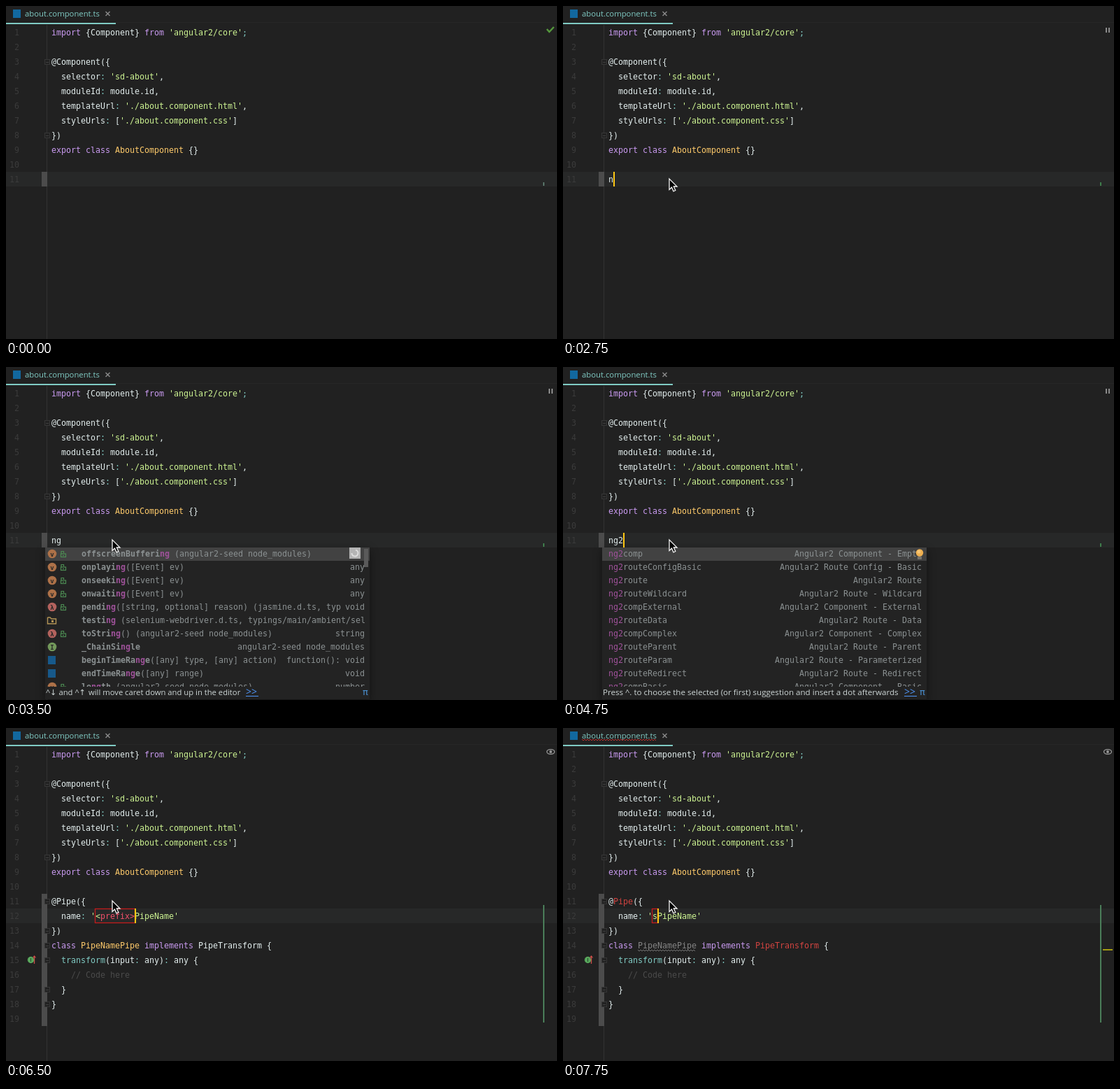
An HTML page with a canvas for the animation above (8000 ms loop, 788 by 476 pixels).

```html
<!DOCTYPE html>
<html lang="en">
<head>
<meta charset="utf-8">
<title>Editor live templates</title>
<style>
html, body { margin: 0; width: 100%; height: 100%; overflow: hidden; background: #212121; }
canvas { display: block; }
</style>
</head>
<body>
<canvas id="stage" width="788" height="476"></canvas>
<script>
const ctx = document.getElementById('stage').getContext('2d');
const LOOP = 8000, TICK = 250;
const CHAR = 7, LINE = 21, LEFT = 65, ROW = 19, POP_TOP = 258;
const MONO = '11.63px "DejaVu Sans Mono", monospace';
const UI = '"Open Sans", "DejaVu Sans", sans-serif';
const BG = '#212121';

// "~x" inside a text switches to colour x
const COLORS = {
  w: '#e3eeee', p: '#c99af0', s: '#cdf492', t: '#80cbc4', y: '#ffcb6b', r: '#d24440',
  g: '#858585', c: '#4b4b4b', m: '#a0529b', d: '#8b9192', k: '#f0506a'
};

const HEAD = [
  "~pimport ~w{Component} ~pfrom ~s'angular2/core'~t;",
  '',
  '~w@Component({',
  "~w  selector~t: ~s'sd-about'~w,",
  '~w  moduleId~t: ~wmodule.id,',
  "~w  templateUrl~t: ~s'./about.component.html'~w,",
  "~w  styleUrls~t: ~w[~s'./about.component.css'~w]",
  '~w})',
  '~pexport class ~yAboutComponent ~w{}',
  ''
];

const pipeCode = (prefix, checked) => [
  `~w@${checked ? '~r' : '~w'}Pipe~w({`,
  `~w  name~t: ~s'${prefix}~sPipeName'`,
  '~w})',
  `~pclass ${checked ? '~g' : '~y'}PipeNamePipe ~pimplements ${checked ? '~r' : '~w'}PipeTransform ~w{`,
  '~t  transform~w(input~t: ~wany)~t: ~wany {',
  '~c    // Code here',
  '~w  }',
  '~w}',
  ''
];

// icon | name | details | type
const SYMBOLS = [
  'v|offscreenBufferi~mng| (angular2-seed node_modules)|',
  'v|onplayi~mng|([Event] ev)|any',
  'v|onseeki~mng|([Event] ev)|any',
  'v|onwaiti~mng|([Event] ev)|any',
  'λ|pendi~mng|([string, optional] reason) (jasmine.d.ts, typ|void',
  'f|testi~mng| (selenium-webdriver.d.ts, typings/main/ambient/sel|',
  'λ|toStri~mng|() (angular2-seed node_modules)|string',
  'I|_ChainSi~mng~dle||angular2-seed node_modules',
  'q|beginTimeRa~mng~de|([any] type, [any] action)|function(): void',
  'q|endTimeRa~mng~de|([any] range)|void',
  'v|le~mng~dth| (angular2-seed node_modules)|number'
];

const template = (name, kind) => `|~mng2~d${name}||Angular2 ${kind}`;
const TEMPLATES = [
  template('comp', 'Component - Empty'),
  template('routeConfigBasic', 'Route Config - Basic'),
  template('route', 'Route'),
  template('routeWildcard', 'Route - Wildcard'),
  template('compExternal', 'Component - External'),
  template('routeData', 'Route - Data'),
  template('compComplex', 'Component - Complex'),
  template('routeParent', 'Route - Parent'),
  template('routeParam', 'Route - Parameterized'),
  template('routeRedirect', 'Route - Redirect'),
  template('compBasic', 'Component - Basic')
];
const PIPES = [
  template('~mp~dipeBasic', 'Pipe - Basic'),
  template('route~mP~daram', 'Route - Parameterized'),
  template('route~mP~darent', 'Route - Parent')
];

const lineTop = n => 27 + (n - 1) * LINE;

function rect(x, y, w, h, color) {
  ctx.fillStyle = color;
  ctx.fillRect(x, y, w, h);
}

function disc(x, y, r, color) {
  ctx.fillStyle = color;
  ctx.beginPath();
  ctx.arc(x, y, r, 0, Math.PI * 2);
  ctx.fill();
}

function path(points, stroke, width = 1, fill) {
  ctx.beginPath();
  points.forEach(([x, y], i) => i ? ctx.lineTo(x, y) : ctx.moveTo(x, y));
  if (fill) {
    ctx.closePath();
    ctx.fillStyle = fill;
    ctx.fill();
  }
  if (stroke) {
    ctx.strokeStyle = stroke;
    ctx.lineWidth = width;
    ctx.stroke();
  }
}

function frame(x, y, w, h, color, width = 1) {
  ctx.strokeStyle = color;
  ctx.lineWidth = width;
  ctx.strokeRect(x, y, w, h);
}

function label(text, x, y, color, font = MONO, align = 'left') {
  ctx.font = font;
  ctx.textAlign = align;
  ctx.fillStyle = color;
  ctx.fillText(text, x, y);
}

function rich(text, x, y, color = COLORS.d, font = MONO) {
  text.split('~').forEach((part, i) => {
    if (i) {
      color = COLORS[part[0]];
      part = part.slice(1);
    }
    label(part, x, y, color, font);
    x += part.length * CHAR;
  });
  return x;
}

function squiggle(x1, x2, y, color) {
  const points = [];
  for (let x = x1, i = 0; x <= x2; x += 2, i++) points.push([x, y + (i % 2) * 2]);
  path(points, color);
}

function drawTab(error) {
  rect(157, 23, 631, 1, '#272727');
  rect(0, 24, 157, 2, '#80cbc4');
  rect(10, 5, 11, 12, '#12689f');
  label('about.component.ts', 27, 15, '#80cbc4', '11.3px ' + UI);
  path([[142.5, 8], [148.5, 14]], '#8a8a8a', 1.4);
  path([[148.5, 8], [142.5, 14]], '#8a8a8a', 1.4);
  if (error) squiggle(27, 134, 16, '#b8322e');
}

function drawStatus(kind) {
  if (kind === 'ok') path([[773.5, 33], [777, 37], [783.5, 30]], '#55983d', 2.5);
  if (kind === 'busy') {
    rect(776, 31, 2, 7, '#8a8a8a');
    rect(780, 31, 2, 7, '#8a8a8a');
  }
  if (kind === 'error') {
    disc(779, 34, 5, '#8e303b');
    rect(778, 31, 2, 4, BG);
    rect(778, 36, 2, 1, BG);
  }
  if (kind === 'eye') {
    ctx.beginPath();
    ctx.ellipse(779, 34, 5.5, 3.4, 0, 0, Math.PI * 2);
    ctx.strokeStyle = '#9a9a9a';
    ctx.lineWidth = 1.3;
    ctx.stroke();
    disc(779, 34, 1.9, '#9a9a9a');
  }
}

function drawFold(line) {
  const y = lineTop(line) + 7;
  rect(55, y, 8, 8, BG);
  frame(55.5, y + .5, 7, 7, '#363636');
  rect(57, y + 4, 4, 1, '#404040');
}

function drawEditor(code, current, lastChanged, folds) {
  rect(0, lineTop(current), 788, LINE, '#272828');
  rect(58, 27, 1, 449, '#323232');
  rect(51, 237, 8, lastChanged * LINE - 210 , '#4c4c4c');
  folds.forEach(drawFold);
  code.forEach((text, i) => {
    const y = lineTop(i + 1) + 15;
    label(i + 1, 19, y, '#3b3b3b', MONO, 'right');
    rich(text, LEFT, y);
  });
}

function drawCaret(column, line) {
  rect(LEFT + column * CHAR, lineTop(line), 2, LINE, '#ffc814');
}

function drawMouse(x, y) {
  const shape = [[0, 0], [0, 15.5], [3.5, 12.2], [6, 17.8], [8.8, 16.5], [6.3, 11], [11, 11]];
  path([...shape, shape[0]].map(([dx, dy]) => [x + dx, y + dy]), '#f4f4f4', 1.3, '#000');
}

function drawIcon(kind, y) {
  if (kind === 'q') return rect(60, y - 6, 11, 12, '#17598a');
  if (kind === 'f') {
    path([[59.5, y - 4], [63, y - 4], [65, y - 2], [71.5, y - 2], [71.5, y + 5], [59.5, y + 5], [59.5, y - 4]], '#b39455', 1.4);
    return rect(65, y, 3, 3, '#b39455');
  }
  disc(66, y, 6.3, { v: '#ad7148', 'λ': '#b3625d', I: '#72985a' }[kind]);
  label(kind, 66, y + 3.5, '#272727', 'bold 9px "DejaVu Sans Mono", monospace', 'center');
  if (kind === 'I') return;
  frame(78.5, y, 7, 4.5, '#4c8b52', 1.2);
  path([[79, y], [79, y - 3.5], [82.5, y - 3.5], [82.5, y - 1]], '#4c8b52', 1.2);
  rect(81, y + 2, 2, 1, '#4c8b52');
}

function drawBulb() {
  disc(510, 265.5, 5.2, '#efb050');
  disc(509, 264, 2.5, '#f8c676');
  rect(507, 271, 6, 4, '#77736c');
}

function drawSpinner(turn) {
  rect(491, 258, 16, 16, '#b4b4b4');
  ctx.beginPath();
  ctx.arc(499, 266, 4.5, turn, turn + 4.5);
  ctx.strokeStyle = '#dedede';
  ctx.lineWidth = 2;
  ctx.stroke();
}

function drawHint(y, withArrows) {
  if (withArrows) {
    label('^↓ and ^↑', 57, y, '#cdd6d6', '11.25px ' + UI);
    label('will move caret down and up in the editor', 118, y, '#cdd6d6', '11.25px ' + UI);
  } else {
    label('Press ^. to choose the selected (or first) suggestion and insert a dot afterwards',
      57, y, '#cdd6d6', '11.6px ' + UI);
  }
  const x = withArrows ? 343 : 488;
  label('>>', x, y, '#4f94f5', '14px ' + UI);
  rect(x, y + 1, 18, 1, '#4f94f5');
  label('π', 510, y, '#4a90d0', '13px "DejaVu Sans", sans-serif');
}

function drawPopup(rows, withIcons) {
  const hintTop = rows.length > 5 ? 457 : POP_TOP + rows.length * ROW - 1;
  const height = hintTop + 18 - POP_TOP;
  ctx.save();
  ctx.shadowColor = 'rgba(0,0,0,.45)';
  ctx.shadowBlur = 12;
  ctx.shadowOffsetY = 4;
  rect(56, POP_TOP, 464, height, '#232323');
  ctx.restore();
  ctx.save();
  ctx.beginPath();
  ctx.rect(56, POP_TOP, 464, hintTop - POP_TOP);
  ctx.clip();
  rect(56, POP_TOP, 464, ROW, '#424242');
  rows.forEach((row, i) => {
    const [icon, name, details, type] = row.split('|');
    const y = POP_TOP + 13 + i * ROW;
    if (icon) drawIcon(icon, y - 4);
    const end = rich(name, withIcons ? 108 : LEFT, y, COLORS.d, (withIcons ? 'bold ' : '') + MONO);
    label(details, end, y, COLORS.d);
    label(type, 513, y, COLORS.d, MONO, 'right');
  });
  ctx.restore();
  if (withIcons) rect(512, 260, 6, 26, '#5a5a5a');
  drawHint(hintTop + 12, withIcons);
}

function drawTooltip() {
  path([[65, 226], [72.5, 235], [80, 226]], '#6797b2', 1, '#376c8b');
  ctx.beginPath();
  ctx.roundRect(-10, 203.5, 179.5, 23, 4);
  ctx.fillStyle = '#376c8b';
  ctx.fill();
  ctx.strokeStyle = '#6797b2';
  ctx.lineWidth = 1;
  ctx.stroke();
  rect(67, 225, 11, 3, '#376c8b');
  label('Pipe ( metadata.d.ts )?', -2, 220, '#b9ccd6', '13px ' + UI);
  label('⌥⏎', 139, 220, '#b9ccd6', '13px "DejaVu Sans", sans-serif');
}

function drawTyping(t) {
  const typed = t < 2750 ? '' : 'ng2p'.slice(0, t < 3000 ? 1 : t < 4250 ? 2 : t < 5000 ? 3 : 4);
  const caretOn = t >= 1750 && !(t >= 3500 && t < 4000) && !(t >= 5750 && t < 6250);
  drawEditor([...HEAD, '~w' + typed], 11, 11, [3, 8]);
  drawTab(false);
  drawStatus(typed ? 'busy' : 'ok');
  rect(768, 252, 2, 5, typed ? '#3f7d4b' : '#587468');

  if (typed.length === 2) {
    drawPopup(SYMBOLS, true);
    if (t < 3750) drawSpinner(t / 200);
    else drawBulb();
  } else if (typed.length > 2) {
    drawPopup(typed.length === 3 ? TEMPLATES : PIPES, false);
    if (t >= 5500 || t >= 4750 && t < 5000) drawBulb();
  }
  if (caretOn) drawCaret(typed.length, 11);
}

function drawTemplate(t) {
  const renamed = t >= 7750, checked = t >= 6750, tooltip = t >= 7000 && !renamed;
  const prefix = renamed ? 's' : '<~kprefix>';
  const width = renamed ? 1 : 8;
  drawEditor([...HEAD, ...pipeCode(prefix, checked)], 12, 19, [3, 8, 11, 13, 14, 15, 17, 18]);
  drawTab(checked);
  drawStatus(tooltip ? 'error' : 'eye');

  disc(35.5, 331.5, 4.7, '#58a65c');
  rect(35, 329, 1, 5, '#22452a');
  path([[40.5, 337], [40.5, 326]], '#d0504a', 1.3);
  path([[38.5, 328.5], [40.5, 326], [42.5, 328.5]], '#d0504a', 1.2);
  rect(768, 253, 2, 168, '#4a7d59');

  if (checked) {
    rect(772, 316, 14, 2, '#a39a12');
    squiggle(107, 190, 317, '#747474');
  }
  frame(127.5, 258.5, width * CHAR + 1, 20, '#c41c1c', 1.3);
  if (tooltip) {
    rect(72, 253, 28, 1, '#8a8a8a');
    drawTooltip();
  }
  if (t < 7500 || renamed) drawCaret(9 + width, 12);
}

function mouseAt(t) {
  if (t >= 1500) return [152, 247];
  const ease = 1 - (1 - (t - 250) / 1000) ** 2;
  return [181 - 29 * ease, 389 - 132 * ease];
}

function draw(now) {
  const t = Math.floor(now % LOOP / TICK) * TICK;
  rect(0, 0, 788, 476, BG);
  if (t < 6500) drawTyping(t);
  else drawTemplate(t);
  if (t >= 250) drawMouse(...mouseAt(t));
}

const start = performance.now();
function tick() {
  draw(performance.now() - start);
  requestAnimationFrame(tick);
}
tick();
</script>
</body>
</html>
```
